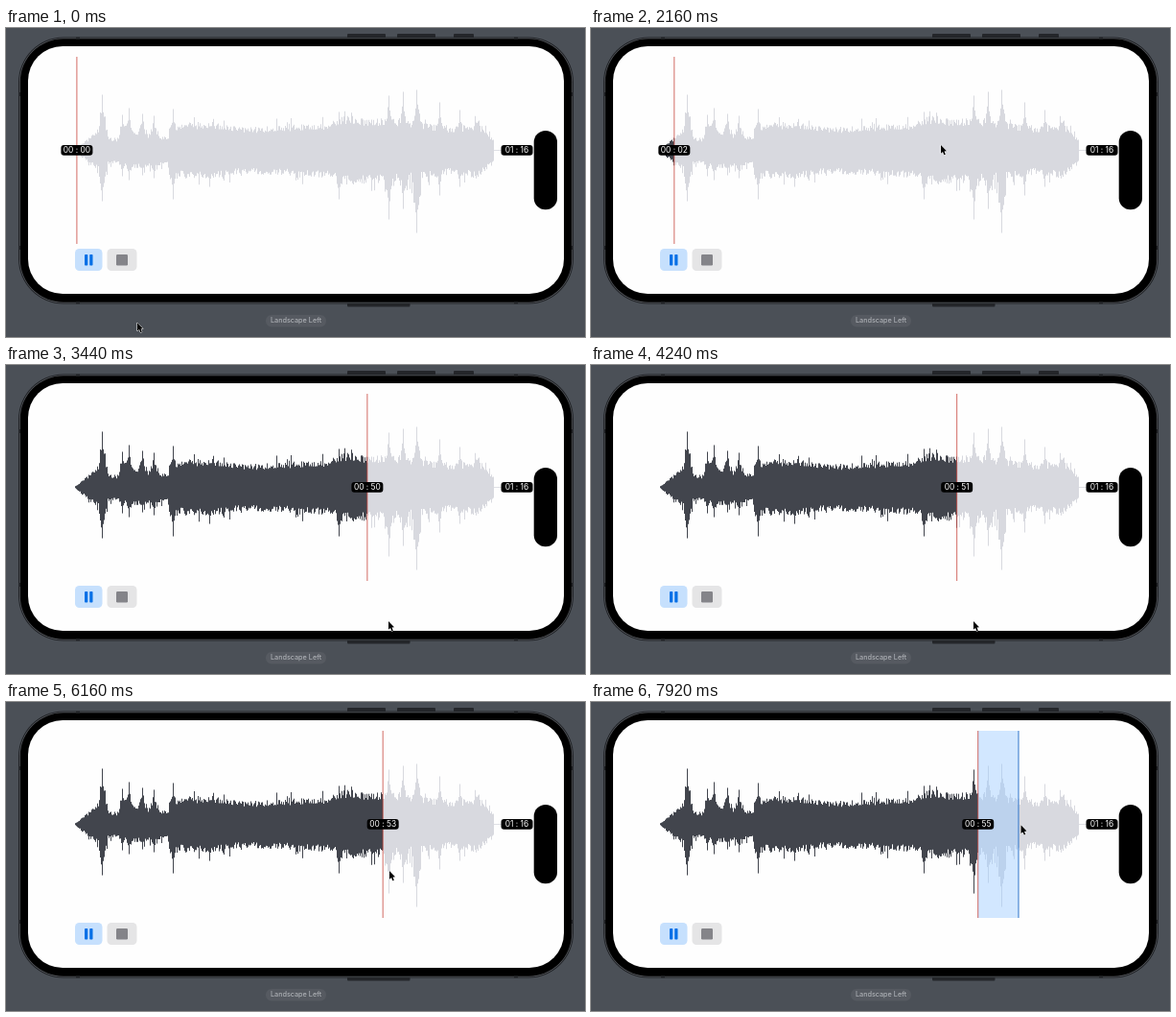
Write an HTML page with a canvas that moves like this. It is 604 by 322 pixels and loops after 8 s.

```html
<!DOCTYPE html>
<html lang="en">
<head>
<meta charset="utf-8">
<title>Waveform player</title>
<style>
  html, body { margin: 0; width: 100%; height: 100%; overflow: hidden; background: #4b5057; }
  canvas { display: block; width: 604px; height: 322px; }
</style>
</head>
<body>
<canvas id="stage" width="604" height="322"></canvas>
<script>
const g = document.getElementById('stage').getContext('2d');
const LOOP = 8000, STEP = 80, MID = 127.5;
const HOLDS = [400, 800, 2400, 3760, 4160, 5760];  // moments the screen repeats itself
const LIGHT = '#d8d9df', DARK = '#42454d', METAL = '#24262a';

// x, typical height on either side of the middle
const BODY = [
  [72, 1], [92, 17], [116, 11], [132, 18], [168, 13], [180, 26], [215, 28],
  [245, 22], [335, 26], [352, 33], [415, 30], [466, 22], [492, 27], [509, 10]
];
// x, height above, height below
const PEAKS = [
  [100, 58, 53], [121, 37, 27], [128, 44, 31], [142, 38, 26], [154, 36, 29], [174, 43, 51],
  [347, 40, 51], [399, 57, 72], [414, 61, 61], [428, 63, 86], [452, 50, 47], [473, 42, 38]
];
// time, pointer tip
const POINTER = [
  [0, 137, 307], [800, 135, 304], [1680, 138, 235], [2160, 365, 122], [2480, 371, 124],
  [2880, 424, 185], [3280, 399, 267], [4240, 399, 267], [5840, 400, 278], [6160, 400, 176],
  [6880, 411, 132], [7200, 426, 131], [8000, 451, 128]
];

function sample(keys, at, col = 1) {
  const i = Math.max(1, keys.findIndex(k => k[0] >= at));
  const a = keys[i - 1], b = keys[i];
  return a[col] + (b[col] - a[col]) * (at - a[0]) / (b[0] - a[0]);
}

let seed = 11;
function random() {
  seed = (seed * 16807) % 2147483647;
  return seed / 2147483647;
}

function barHeight(x, side) {
  const burst = random() < 0.09 ? 1.3 : 1;
  let h = sample(BODY, x) * (0.8 + 0.3 * random()) * burst;
  for (const p of PEAKS) {
    const d = Math.abs(x - p[0]);
    if (d < 6) h = Math.max(h, p[side] * (1 - 0.35 * Math.sqrt(d) * (0.6 + 0.4 * random())));
  }
  return h;
}

const wave = new Path2D();
for (let x = 72; x < 509; x++) {
  const up = barHeight(x, 1), down = barHeight(x, 2);
  wave.rect(x, MID - up, 1, up + down);
}

function box(x, y, w, h, r, color) {
  g.fillStyle = color;
  g.beginPath();
  g.roundRect(x, y, w, h, r);
  g.fill();
}

function text(str, x, y, size, color) {
  g.font = `${size}px Inter, Roboto, sans-serif`;
  g.textAlign = 'center';
  g.textBaseline = 'middle';
  g.fillStyle = color;
  g.fillText(str, x, y);
}

function timeTag(x, seconds) {
  const pad = n => String(n).padStart(2, '0');
  box(x - 16.5, 122, 33, 10.8, 3, '#000');
  text(`${pad(Math.floor(seconds / 60))} : ${pad(seconds % 60)}`, x, 127.9, 8.4, '#fff');
}

function drawDevice(pressed) {
  box(0, 0, 604, 322, 0, '#4b5057');
  for (const [x, w] of [[356, 40], [408, 40], [467, 21]]) box(x, 6, w, 6, 1, METAL);
  box(356, 284, 65.5, pressed ? 9.5 : 6.5, 1, METAL);
  box(13, 9.5, 579, 278, 47, '#212327');
  box(14, 10.5, 577, 276, 46, '#595c61');
  box(14.8, 11.3, 575.4, 274.4, 45, '#000');
  for (const x of [73, 530]) for (const y of [9.5, 285.5]) box(x, y, 4, 2, 0, METAL);
  for (const x of [13, 590]) for (const y of [67, 227]) box(x, y, 2, 4, 0, METAL);
  box(23, 19, 559, 258, 36, '#fefefe');
  box(550.7, 107, 24.3, 82.3, 12.1, '#000');
  box(271, 299, 63, 12.5, 6.2, '#565a61');
  text('Landscape Left', 302.5, 305.3, 7.3, '#b9bcc0');
}

function drawButtons() {
  box(72, 230, 28.5, 23, 4.5, '#c6e0fd');
  for (const x of [82, 87.2]) box(x, 236, 3.3, 11.5, 0.8, '#0870e6');
  box(105.5, 230, 31, 23, 4.5, '#e5e5e6');
  box(115, 236, 12, 11.5, 1.2, '#848489');
}

function drawWave(head) {
  box(509, MID - 0.4, 8, 0.8, 0, LIGHT);
  g.fillStyle = LIGHT;
  g.fill(wave);
  g.save();
  g.beginPath();
  g.rect(0, 0, head, 322);
  g.clip();
  g.fillStyle = DARK;
  g.fill(wave);
  g.restore();
}

const arrow = new Path2D('M0 0V8.8L2 7.1L3.3 10.3L4.8 9.7L3.5 6.6L6 6.3Z');
function drawPointer(x, y) {
  g.save();
  g.translate(x, y);
  g.lineJoin = 'round';
  g.strokeStyle = '#fff';
  g.stroke(arrow);
  g.fillStyle = '#000';
  g.fill(arrow);
  g.restore();
}

function draw(now) {
  let t = Math.floor((now % LOOP) / STEP) * STEP;
  if (HOLDS.includes(t)) t -= STEP;

  const seconds = t / 1000 + (t < 2480 ? 0 : 47.14);
  const head = 73.9 + 5.99 * seconds;

  drawDevice(t >= 4320 && t < 5920);
  drawWave(head);
  if (t >= 6960) {
    const edge = sample(POINTER, t - STEP);  // the selection trails the pointer
    box(head, 30, edge - head, 195, 0, 'rgba(150,200,255,.43)');
    box(edge - 0.5, 30, 1, 195, 0, '#2e75c9');
  }
  box(head - 0.5, 30, 1, 195, 0, 'rgba(196,58,48,.75)');
  timeTag(533, 76);
  timeTag(head, Math.floor(seconds));
  drawButtons();
  if (t <= 4240 || t >= 5840) drawPointer(sample(POINTER, t, 1), sample(POINTER, t, 2));
}

const start = performance.now();
function frame() {
  draw(performance.now() - start);
  requestAnimationFrame(frame);
}
frame();
</script>
</body>
</html>
```
